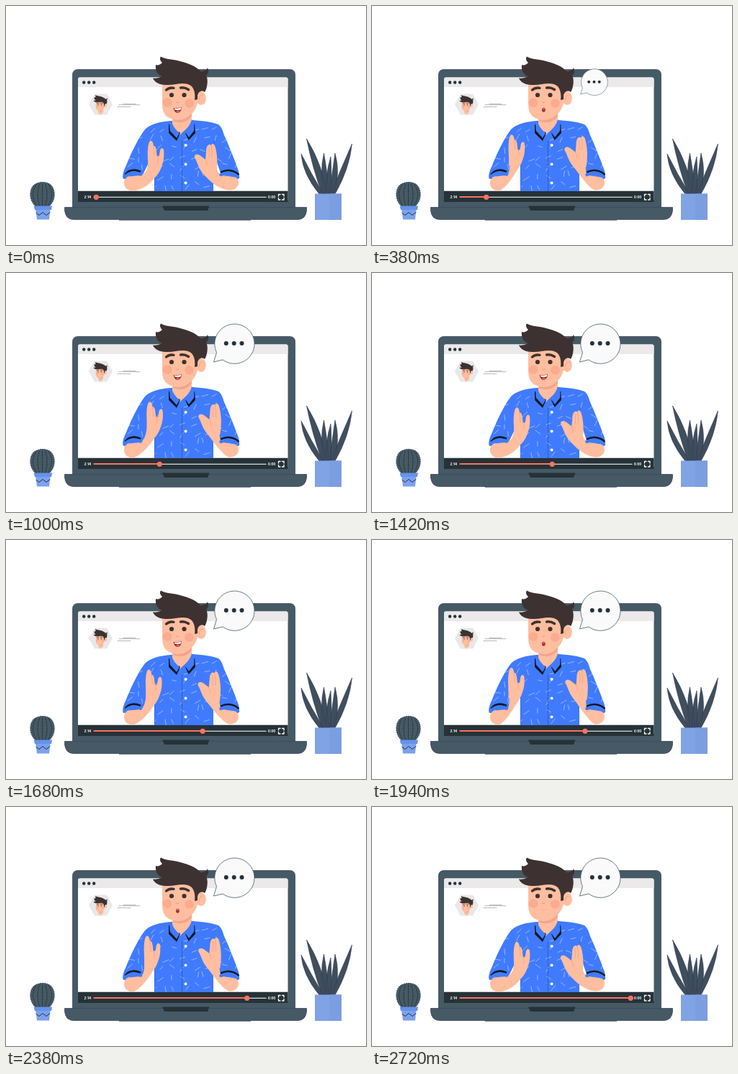
Recreate the animation shown at these times as an HTML page. Size 500 by 333 pixels, loop 2.74 s.

```html
<!DOCTYPE html>
<html lang="en">
<head>
<meta charset="utf-8">
<title>Video call</title>
<style>
html, body { margin: 0; width: 100%; height: 100%; overflow: hidden; background: #fff; }
svg { display: block; width: 100vw; height: 100vh; }
text { font: 700 4.7px Inter, Arial, sans-serif; fill: #fff; }
.line { fill: none; stroke-linecap: round; stroke-linejoin: round; }
.skin { fill: #ffbe9f; }
.crease { stroke: #ec9d84; stroke-width: .7; }
</style>
</head>
<body>
<svg viewBox="0 0 500 333">
  <defs>
    <path id="shirt" d="M229 160C215 161 202 164 194 171C186 180 175 202 167 222C163 230 161 237 163 241L189 237L206 203V258H288V203L299 236L322 241C325 238 324 232 322 227C317 213 309 193 303 180C301 173 299 168 295 165C288 162 274 160 259 159Z"/>
    <clipPath id="cloth"><use href="#shirt"/></clipPath>
  </defs>

  <!-- laptop -->
  <g stroke="#3f4566" stroke-width=".8" fill="#455a64">
    <path d="M92.5 282V96Q92.5 88.5 100 88.5H394Q401.5 88.5 401.5 96V282Z"/>
    <path d="M81.5 280.5H417.5V285Q416 297.5 405 297.5H94Q83 297.5 81.5 285Z"/>
  </g>
  <path d="M157 298.2H340" stroke="#37474f"/>
  <path d="M217 278.5H282.5L280 285H220Z" fill="#263238"/>
  <rect x="100" y="99.500" width="291.500" height="172" rx="2.500" fill="#fff"/>
  <path d="M100 113V102Q100 99.5 102.5 99.5H389Q391.5 99.5 391.5 102V113Z" fill="#ebe9ea"/>
  <path class="line" d="M108.200 106.500h0M115.200 106.500h0M122.200 106.500h0" stroke="#263238" stroke-width="4.400"/>

  <!-- profile -->
  <path d="M115 137L123 122.500H140L148 137L140 151.500H123Z" fill="#e8e8e8"/>
  <use href="#head" transform="translate(70.500 106.700) scale(.25)"/>
  <path class="line" d="M163 136.500H180M157 137.700H186M155 140.500H173" stroke="#9a9a9a" stroke-width=".7"/>

  <!-- player -->
  <path d="M100 257.700H391.500V273H100Z" fill="#263238"/>
  <text x="108.500" y="267.700">2:14</text>
  <text x="364" y="267.700" style="font-size:4.400px">6:00</text>
  <path class="line" d="M122.500 266.400H361" stroke="#d9dcdd" stroke-width="1.400"/>
  <path class="line" id="played" stroke="#ff725e" stroke-width="2.200"/>
  <circle id="knob" cy="266.300" r="3.600" fill="#ff725e"/>
  <path class="line" d="M378.500 265V262.500H381M383.500 262.500H386V265M386 267.500V270H383.500M381 270H378.500V267.500" stroke="#fff" stroke-width="1.300"/>

  <!-- shirt -->
  <use href="#shirt" fill="#407bff"/>
  <path class="line" id="dashes" clip-path="url(#cloth)" stroke="#a9c5ff" stroke-width=".8"/>
  <path class="line" d="M244.500 188V258" stroke="#2b4f9e" stroke-width=".8" stroke-dasharray="3 1.500"/>
  <path class="line" d="M206.500 205V257M289 187V205" stroke="#2f62d0" stroke-width=".7"/>
  <path class="line" d="M249.500 194v0M249.500 220.500v0M249.500 246.500v0" stroke="#fff" stroke-width="4.200"/>

  <!-- head and collar -->
  <g id="head">
    <path class="skin" d="M231 150H258V166L241 180L231 168Z"/>
    <path d="M232 158C242 161 252 157 258 149V153C252 163 240 164 232 160Z" fill="#f3a58c"/>
    <ellipse class="skin" cx="271" cy="128.500" rx="6.800" ry="9.500"/>
    <path class="line crease" d="M268 131Q269 123 274 124"/>
    <path class="skin" d="M217 106V137C217 151 224 158 237 158C254 158 265 147 267 130V106Z"/>
    <g fill="#fbab8f">
      <circle cx="224" cy="134.500" r="6.300"/><circle cx="254.500" cy="135.500" r="6.300"/>
    </g>
    <path d="M204 100.500C208 101 213 100 217 98C211 96 207 91 208 82C211 83 214 82 217 79C214 76 213 73 215 70.500C223 75 232 74 242 77C254 80 264 84 270 91C275 91 279 89 280 86C282 91 281 94 278 97C281 101 280 114 276 120C272 117 267 119 266 125V130L262 131C263 124 262 117 258 112C248 104 235 111 222 110C213 110 206 106 204 100.500Z" fill="#3d3231"/>
    <path class="line" d="M222.500 117Q227 113.200 233 114.300M242.500 114Q248 113 253.500 116.500" stroke="#3d3231" stroke-width="3.400"/>
    <path class="line" d="M230 124h0M247.500 124h0" stroke="#3d3231" stroke-width="6.200"/>
    <path class="line" d="M236.500 134Q238.500 136 240 134" stroke="#ef927a"/>
  </g>
  <path d="M226 164V177L237 188L242 177L240 175L236 182ZM262 164L263 177L253.500 187L249 177L251 175L255 182Z" fill="#101820"/>
  <path d="M230 160C227 164 227 169 228 174L237 184L241 177C235 172 231 166 230 160ZM258 158C256 167 249 173 243 178L249 176L254 183L261 174C262 168 261 162 258 158Z" fill="#407bff"/>

  <!-- smile, round, shut -->
  <g class="mouth">
    <path d="M232.500 142Q238 143 244 141Q243 149 238 149Q234 148.500 232.500 142Z" fill="#8e2629"/>
    <path d="M233.500 142.500Q238 143.500 243.500 141.500L242.500 144.500Q238 146 234.500 144.500Z" fill="#fff"/>
    <path d="M236 147.500Q238.500 145 241.500 147Q239 150 236 147.500Z" fill="#f0655a"/>
  </g>
  <g class="mouth">
    <ellipse cx="238.400" cy="144.800" rx="2.400" ry="3" fill="#a6302f"/>
    <path d="M236.800 143.500Q238.400 142 240 143.500Z" fill="#fff"/>
  </g>
  <path class="mouth line" d="M236 143.500Q238.500 144.300 241 143.300" stroke="#f3a58c" stroke-width=".8"/>

  <!-- arms -->
  <path class="skin" id="armL"/>
  <g id="handL">
    <path class="skin" d="M197 230C198 218 196 210 197 199C198 191 199 187 202 188C204 189 204.500 192 205 195C208 194 209 200 209.500 208C212 211 213 209 213.500 204C214 198 217 196 219 200C220 208 219 216 217 221C215 228 212 234 207 239Z"/>
    <path class="line crease" d="M205 195Q206 202 206 208M209.500 208Q212 213 211 218"/>
  </g>
  <path class="skin" id="armR"/>
  <g id="handR">
    <path class="skin" d="M292 234C294 222 294 208 290.500 196C289 191 286 191 285 194C281 191 278 196 278 203L277 214C273 211 270 208 267 207C263 206 260 209 263 213C266 219 267 224 271 230C275 236 280 240 285 242Z"/>
    <path class="line crease" d="M285 194Q287 202 286 211M282 197Q283 204 282 211M277 214Q280 218 279 222"/>
  </g>
  <path class="line" d="M166 234.500C170 228.500 178 227 186 230.500M299 231.500C307 227 317 229 322.500 234.500" stroke="#101820" stroke-width="2.600"/>
  <path class="line" d="M165 238.500C169 232.500 178 231.500 187 234.500M298.500 235C307 231 317 233 322 238.500" stroke="#407bff" stroke-width="4.500"/>

  <!-- speech bubble -->
  <g id="bubble">
    <path d="M292.500 110.600L288.500 124L301 120.900A27.600 27.600 0 1 0 292.500 110.600Z" fill="#fafafa" stroke="#455a64" stroke-width=".8"/>
    <path class="line" d="M305.800 98h0M316.700 98h0M327.500 98h0" stroke="#263238" stroke-width="6"/>
  </g>

  <!-- cactus -->
  <path d="M41 279C32 271 32 257 38 250C45 244 57 244 63 250C69 257 69 271 60 279Z" fill="#455a64" stroke="#343a5e" stroke-dasharray="2 1"/>
  <path class="line" id="ribs" stroke="#263238" stroke-width=".9" stroke-dasharray="3 1.500"/>
  <path d="M41 283H61.500L60 297.500H43Z" fill="#7ba2f0"/>
  <path d="M38.500 278.500H64L63 284H40Z" fill="#6592ea"/>
  <path class="line" d="M42 288.500L46 291.500L51 287.500L56 291.500L61 287.500" stroke="#263238"/>

  <!-- house plant -->
  <path id="leaves" fill="#3f4f5c" stroke="#343a5e" stroke-width=".6"/>
  <path d="M429 261.500H466V298H429Z" fill="#80a3e5"/>
  <path d="M449 261.500H466V298H449Z" fill="#7c9de0"/>
</svg>
<script>
const LOOP = 2740, GESTURE = LOOP / 2, SYLLABLE = 400;
const $ = id => document.getElementById(id);
const set = (id, name, value) => $(id).setAttribute(name, value);
const mouths = document.querySelectorAll('.mouth');

const smooth = p => { p = Math.max(0, Math.min(1, p)); return p * p * (3 - 2 * p); };

// repeatable random numbers from 0 to 1
let seed = 7;
const random = () => (seed = seed * 16807 % 2147483647) / 2147483647;

// strokes strewn over the shirt on a loose grid
function strew() {
  let d = '';
  for (let y = 168; y < 258; y += 13) {
    for (let x = 168; x < 322; x += 15) {
      const a = random() * Math.PI, r = 3 + random() * 1.5;
      const dx = r * Math.cos(a), dy = r * Math.sin(a);
      d += `M${x + random() * 9 - dx} ${y + random() * 8 - dy}l${2 * dx} ${2 * dy}`;
    }
  }
  return d;
}

// a blade from the pot to its tip, bent towards midX
function leaf(tipX, tipY, baseX, midX, half) {
  const base = 262, midY = (tipY + base) / 2;
  return `M${baseX - 3} ${base}Q${midX - half} ${midY} ${tipX} ${tipY}Q${midX + half} ${midY} ${baseX + 3} ${base}Z`;
}

function ribs() {
  let d = '';
  for (let k = -2; k <= 2; k++) d += `M${50.5 + k * 4} 278Q${50.5 + k * 9} 262 ${50.5 + k * 4} 248`;
  return d;
}

set('dashes', 'd', strew());
set('ribs', 'd', ribs());
set('leaves', 'd', leaf(410, 206, 438, 418, 6) + leaf(417.5, 185, 442, 433, 8) + leaf(480.5, 192, 454, 471, 6)
  + leaf(441.5, 205, 445, 441, 6) + leaf(451, 210, 448, 448, 5) + leaf(457, 205, 452, 459, 6));

function drawArms(t) {
  const lift = smooth(Math.sin(Math.PI * (t % GESTURE) / GESTURE));
  const sway = 4 + 4.5 * Math.cos(2 * Math.PI * (t - 450) / 1650);
  const lx = -sway * lift, ly = -10 * lift, rx = 6.5 * lift, ry = -12 * lift;
  set('handL', 'transform', `translate(${lx} ${ly})`);
  set('handR', 'transform', `translate(${rx} ${ry})`);
  set('armL', 'd', `M167 238C160 248 166 258 177 257.500C${190 + lx / 2} ${256 + ly * .4} ${203 + lx} ${248 + ly} ${214 + lx} ${228 + ly}L${197 + lx} ${216 + ly}C${198 + lx} ${227 + ly} 193 235 186 236Z`);
  set('armR', 'd', `M321 239C327 251 318 257.500 309 256.500C${297 + rx / 2} ${255 + ry * .3} ${284 + rx} ${247 + ry} ${272 + rx} ${231 + ry}L${293 + rx} ${216 + ry}C${291 + rx} ${229 + ry} 295 234 301 236Z`);
}

function drawMouth(t) {
  const shape = t > 2600 ? 2 : t % SYLLABLE < 280 ? 0 : 1;
  mouths.forEach((m, i) => m.style.display = i === shape ? '' : 'none');
}

function drawPlayer(t) {
  const x = Math.min(359.3, 125.2 + .088 * t);
  set('played', 'd', `M122.500 266H${x}`);
  set('knob', 'cx', x);
}

function drawBubble(t) {
  const s = smooth((t - 160) / 360);
  $('bubble').style.display = s > 0 ? '' : 'none';
  set('bubble', 'transform', `translate(292 121) scale(${s}) translate(-292 -121)`);
}

function draw(t) {
  drawArms(t);
  drawMouth(t);
  drawPlayer(t);
  drawBubble(t);
}

const start = performance.now();
function tick() {
  draw((performance.now() - start) % LOOP);
  requestAnimationFrame(tick);
}
draw(0);
requestAnimationFrame(tick);
</script>
</body>
</html>
```
